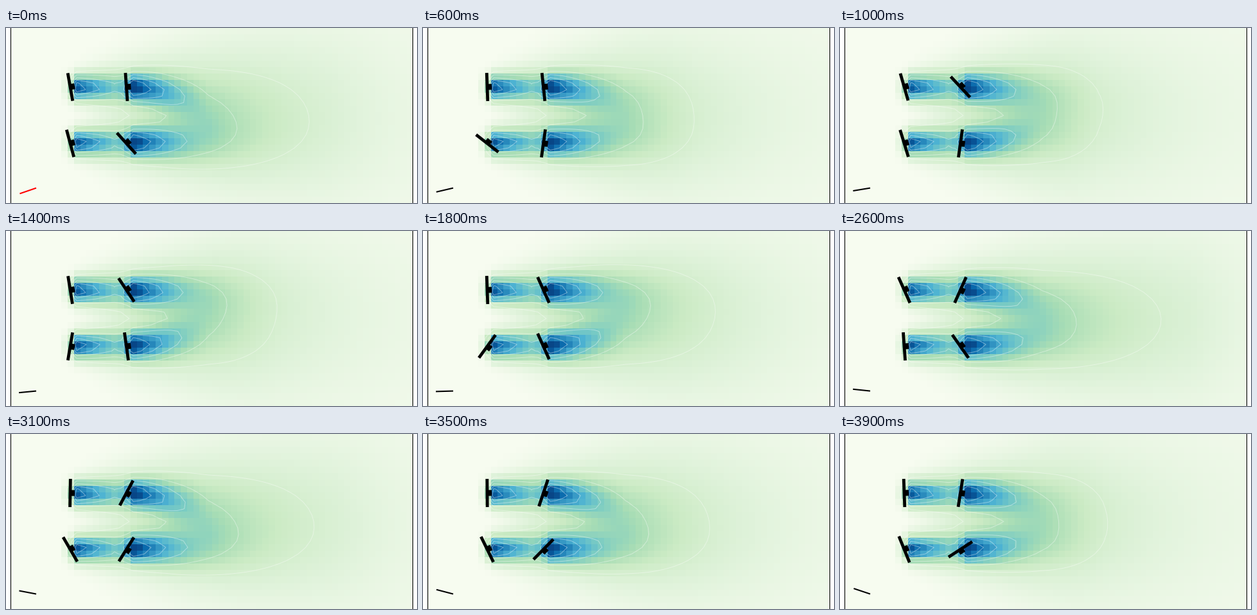
A matplotlib script that plays this animation: 640x273 px, repeating every 4 s.

```python
import numpy as np
import matplotlib.pyplot as plt
from matplotlib.animation import FuncAnimation
from matplotlib.patches import Polygon

W, H, DPI = 640, 273, 100
FRAMES, STEP = 40, 100
LEFT, RIGHT = 7.5, 633.5
COLS, ROWS = 64, 27
LEVELS = np.arange(0.19, 0.95, 0.152)

x = LEFT + (np.arange(COLS) + 0.5) * (RIGHT - LEFT) / COLS
y = (np.arange(ROWS) + 0.5) * H / ROWS
X, Y = np.meshgrid(x, y)

FRONT, REAR = 100, 187.5
ROTORS = [(FRONT, 92), (REAR, 92), (FRONT, 180), (REAR, 180)]

# Yaw key poses in degrees, one column per rotor
KEYS = [0, 6, 10, 18, 26, 31, 39]
YAW = np.array([
    (-10, -4, -15, -42),
    (-2, -6, -52, 8),
    (-16, -43, -17, 8),
    (-2, -24, 36, -24),
    (-24, 24, -4, -35),
    (1, 28, -30, 32),
    (-2, 9, -22, 57),
])


def bell(d, s):
    return np.exp(-0.5 * (d / s) ** 2)


def onset(u):
    return np.interp(u, [-15, -10, 0, 10], [0, 0.06, 0.37, 1])


def deficit(i):
    """Velocity deficit: wide halos, front wakes and bent rear wakes."""
    phase = 2 * np.pi * i / 32
    reach = np.cos(phase - 2 * np.pi * 26 / 32)
    sway = 12 * np.cos(phase)

    # The far field stretches and shrinks along the stream
    xr = np.interp(X, [0, 280, 365 + 25 * reach, 475 + 72 * reach, 700],
                   [0, 280, 365, 470, 700])
    u, v = X - FRONT, X - REAR
    up, vp = np.maximum(u, 0), np.maximum(v, 0)
    ur = np.maximum(xr - FRONT, 0)

    halo = 0.175 / (1 + (ur / 350) ** 3.5)
    front = 0.88 * np.exp(-up / 75)
    rear = 0.75 * np.exp(-vp / (70 + 5 * reach))
    bend = np.clip(vp / 100, 0, 1.3) ** 2

    total = np.zeros_like(X)
    for yc, pull in ((93, 12), (179, -12)):
        d = Y - yc
        total += onset(u) * halo * bell(d, 14 + 0.23 * ur)
        total += onset(u) * front * bell(d, 12.5 + 0.05 * up)
        total += onset(v) * rear * bell(d - bend * (pull + sway),
                                        12.5 + 0.11 * vp)
    return np.clip(total, 0, 0.98)


def turned(points, centre, degrees):
    a = np.radians(degrees)
    turn = np.array([[np.cos(a), -np.sin(a)], [np.sin(a), np.cos(a)]])
    return np.array(points) @ turn.T + centre


def box(x0, x1, half):
    return [(x0, -half), (x1, -half), (x1, half), (x0, half)]


SHAPES = box(-2.4, 2.4, 22), box(0, 7, 4.6)

fig = plt.figure(figsize=(W / DPI, H / DPI), dpi=DPI, facecolor="white")
ax = fig.add_axes([0, 0, 1, 1])
ax.axis("off")
image = ax.imshow(deficit(0), cmap="GnBu", vmin=0, vmax=1, aspect="auto",
                  extent=(LEFT, RIGHT, H, 0), interpolation="nearest")
ax.set_xlim(0, W)
ax.set_ylim(H, 0)
for edge in (LEFT, RIGHT):
    ax.plot([edge - 0.5] * 2, [0, H], color="black", lw=0.8)

parts = []
for _ in ROTORS:
    pair = [Polygon(shape, fc="black", ec="none", zorder=5)
            for shape in SHAPES]
    for patch in pair:
        ax.add_patch(patch)
    parts.append(pair)
wind, = ax.plot([], [], lw=1.5, solid_capstyle="butt", zorder=5)
lines = []


def update(i):
    field = deficit(i)
    image.set_data(field)
    while lines:
        lines.pop().remove()
    lines.append(ax.contour(X, Y, field, levels=LEVELS, colors="white",
                            alpha=0.4, linewidths=0.72, zorder=3))

    for centre, pair, yaw in zip(ROTORS, parts, YAW.T):
        for patch, shape in zip(pair, SHAPES):
            patch.set_xy(turned(shape, centre, np.interp(i, KEYS, yaw)))

    a = np.radians(19 - 37.5 * i / (FRAMES - 1))
    wind.set_data([47 - 27 * np.cos(a), 47], [249.6 + 27 * np.sin(a), 249.6])
    wind.set_color("red" if i == 0 else "black")
    return [image, wind]


anim = FuncAnimation(fig, update, frames=FRAMES, interval=STEP,
                     init_func=lambda: update(0), repeat=True,
                     repeat_delay=0, blit=False)
plt.show()
```
